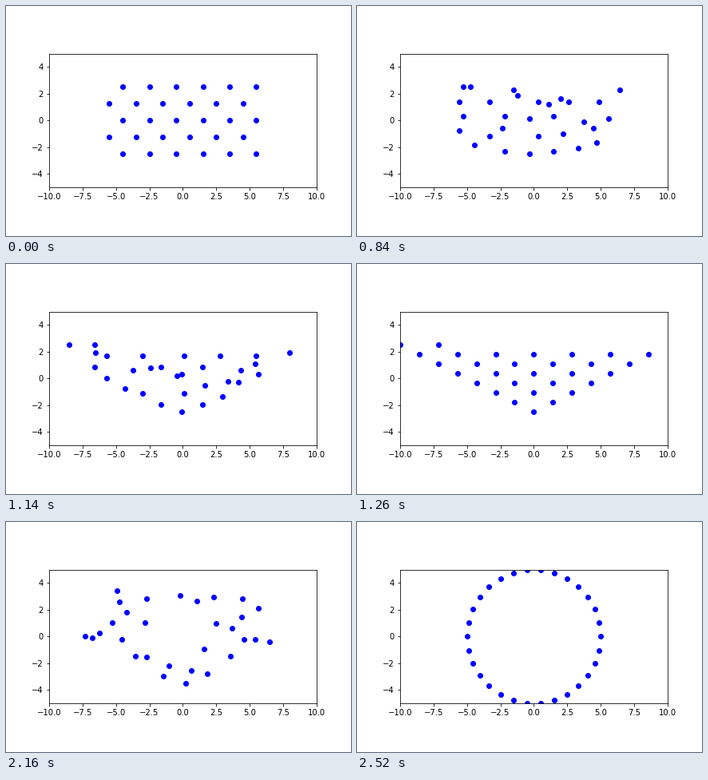
Write a matplotlib script that moves like this. It is 432x288 px and loops after 3.18 s.

```python
import numpy as np
import matplotlib.pyplot as plt
from matplotlib.animation import FuncAnimation

FRAMES, INTERVAL = 53, 60
MOVE = 10                # frames per transition
TO_WEDGE, TO_RING = 11, 32   # last still frame before each move

# For each grid dot (bottom row first), its slot in the wedge
WEDGE_SLOT = [6, 1, 0, 2, 5, 13,
              10, 3, 16, 4, 8, 19,
              15, 17, 12, 18, 9, 14,
              22, 23, 20, 24, 25, 26,
              29, 28, 11, 21, 7, 27]
# For each wedge slot (apex first), its slot on the ring
RING_SLOT = [23, 21, 25, 17, 24, 28, 15, 22, 3, 0,
             13, 20, 27, 1, 29, 16, 12, 14, 7, 2,
             4, 18, 11, 10, 8, 6, 5, 26, 19, 9]


def make_grid():
    return np.array([(2 * col - 4.5 - row % 2, 1.25 * row - 2.5)
                     for row in range(5) for col in range(6)])


def make_wedge(count=30):
    pts = [((2 * k - row) * 10 / 7, row * 5 / 7 - 2.5)
           for row in range(8) for k in range(row + 1)]
    return np.array(pts[:count])


def make_ring(count=30, radius=5):
    a = 2 * np.pi * np.arange(count) / count
    return radius * np.column_stack([np.cos(a), np.sin(a)])


grid = make_grid()
wedge = make_wedge()[WEDGE_SLOT]
ring = make_ring()[RING_SLOT][WEDGE_SLOT]


def progress(n, start):
    return min(max((n - start) / MOVE, 0), 1)


def positions(n):
    u, v = progress(n, TO_WEDGE), progress(n, TO_RING)
    if v > 0:
        return (1 - v) * wedge + v * ring
    return (1 - u) * grid + u * wedge


fig = plt.figure(figsize=(6, 4), dpi=72, facecolor="white")
fig.subplots_adjust(left=0.125, right=0.9, bottom=0.125, top=0.88)
ax = fig.add_subplot()
ax.set_aspect("equal")
ax.set(xlim=(-10, 10), ylim=(-5, 5),
       xticks=np.arange(-10, 10.1, 2.5), yticks=np.arange(-4, 5, 2))
dots, = ax.plot(*grid.T, "bo", markersize=6)


def update(n):
    dots.set_data(*positions(n).T)
    return dots,


anim = FuncAnimation(fig, update, frames=FRAMES, interval=INTERVAL,
                     repeat=True, repeat_delay=0)
plt.show()
```
